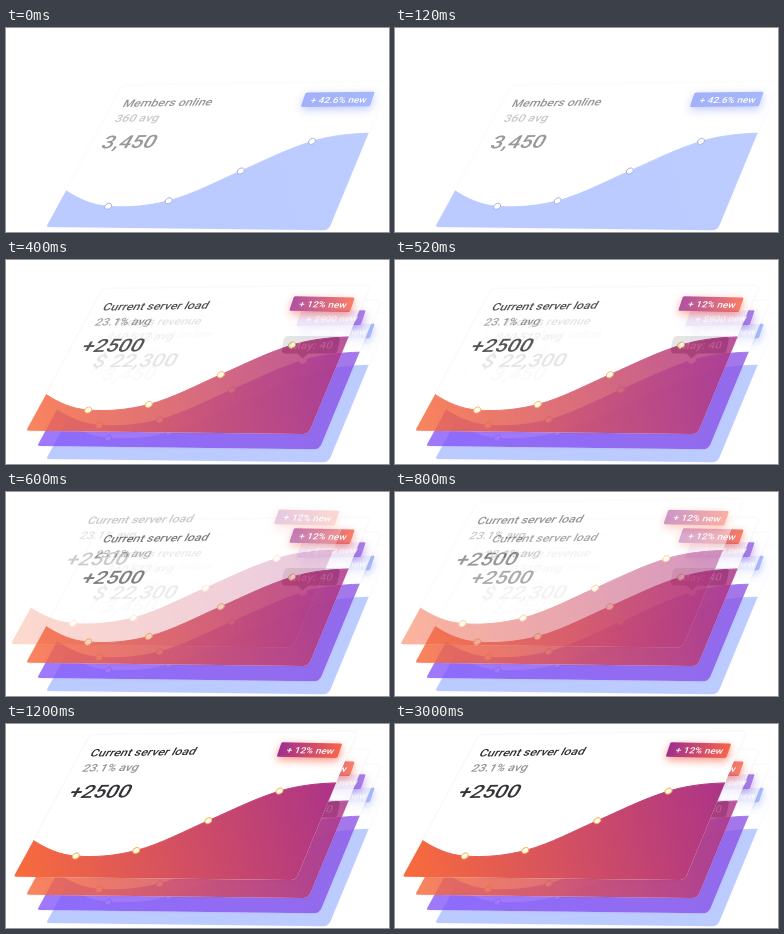
Write an HTML page with a canvas that moves like this. It is 383 px wide and 204 px high and loops after 4.2 s.

```html
<!DOCTYPE html>
<html lang="en">
<head>
<meta charset="utf-8">
<title>Stacked dashboard cards</title>
<style>
html, body { margin: 0; width: 100%; height: 100%; overflow: hidden; background: #fff; }
canvas { display: block; width: 383px; height: 204px; }
</style>
</head>
<body>
<canvas id="stage"></canvas>
<script>
const W = 383, H = 204, STEP = 200, LOOP = 4200;
const FONT = 'Roboto, Arial, sans-serif';
const dpr = window.devicePixelRatio || 1;

function prepare(canvas) {
  canvas.width = W * dpr;
  canvas.height = H * dpr;
  return canvas.getContext('2d');
}

const stage = document.getElementById('stage');
const ctx = prepare(stage);
const layer = document.createElement('canvas');
const g = prepare(layer);

const members = {
  title: 'Members online', sub: '360 avg', value: '3,450', tag: '+ 42.6% new', tilt: -0.01,
  wave: ['#7a98ff', '#7c9aff'], pill: ['#4664f4', '#5272f8'], ring: '#4c62c0', dot: '#fff'
};
const revenue = {
  title: 'Today’s revenue', sub: '$40,512 avg', value: '$ 22,300', tag: '+ $900 new', tilt: -0.02,
  wave: ['#804dfb', '#864ae4'], pill: ['#6f38cc', '#8850dc'], ring: '#68b878', dot: '#fff',
  tip: 'May: 40'
};
const load = {
  title: 'Current server load', sub: '23.1% avg', value: '+2500', tag: '+ 12% new', tilt: 0.022,
  wave: ['#f76a3e', '#ae3586'], pill: ['#9f2f90', '#f8644a'], ring: '#f3ad4c', dot: '#fffbe8'
};

const dots = [[102.2, 178.3], [162.7, 172.8], [234.8, 143], [306, 113.4]];

function ramp(x0, y0, x1, y1, colors) {
  const fill = g.createLinearGradient(x0, y0, x1, y1);
  colors.forEach((c, i) => fill.addColorStop(i, c));
  return fill;
}

function shadow(color, blur, dy) {
  g.shadowColor = color;
  g.shadowBlur = blur * dpr;
  g.shadowOffsetY = dy * dpr;
}

function plainShadow() {
  shadow('transparent', 0, 0);
}

// Text lies in the plane of the tilted card.
function label(text, x, y, size, weight, color, lean = -0.47, tilt = -0.018) {
  g.save();
  g.transform(1, tilt, lean, 0.84, x, y);
  g.font = `${weight} ${size}px ${FONT}`;
  g.fillStyle = color;
  g.fillText(text, 0, 0);
  g.restore();
}

function textWidth(text, size, weight) {
  g.font = `${weight} ${size}px ${FONT}`;
  return g.measureText(text).width;
}

function skewBox(x, y, w, h, lean, r, fill, tilt = 0) {
  g.save();
  g.transform(1, tilt, -lean / h, 1, x, y);
  g.beginPath();
  g.roundRect(0, 0, w, h, r);
  g.fillStyle = fill;
  g.fill();
  g.restore();
}

function bottomRight() {
  g.lineTo(324.6, 197);
  g.quadraticCurveTo(322, 203, 316, 202.3);
}

function drawSheet() {
  g.beginPath();
  g.moveTo(41, 199);
  g.lineTo(115, 61);
  g.quadraticCurveTo(117, 57.5, 121, 57.4);
  g.lineTo(379, 54);
  g.quadraticCurveTo(384, 54, 382, 58);
  bottomRight();
  g.closePath();
  shadow('rgba(30,30,60,.08)', 3, 0);
  g.fillStyle = '#fff';
  g.fill();
  plainShadow();
}

function traceCurve() {
  g.beginPath();
  g.moveTo(60, 162.8);
  g.bezierCurveTo(72, 170.6, 86, 177.2, 102.2, 178.3);
  g.bezierCurveTo(122, 180, 143, 177.8, 162.7, 172.8);
  g.bezierCurveTo(189, 165.7, 212, 152.7, 234.8, 143);
  g.bezierCurveTo(258, 132.7, 282, 120.7, 306, 113.4);
  g.bezierCurveTo(325, 107.7, 344, 105.7, 362.5, 105.2);
}

function drawWave(colors) {
  traceCurve();
  bottomRight();
  g.lineTo(43, 199);
  g.quadraticCurveTo(40, 199, 41.5, 196.5);
  g.closePath();
  g.fillStyle = ramp(48, 185, 355, 115, colors);
  g.fill();
  traceCurve();
  g.strokeStyle = g.fillStyle;
  g.lineWidth = 1;
  g.stroke();
}

function drawDots(card) {
  dots.forEach(([x, y], i) => {
    g.beginPath();
    g.ellipse(x, y, 3.7, 2.7, -0.45, 0, 7);
    g.fillStyle = card.dot;
    g.fill();
    g.strokeStyle = card.tip && i === 3 ? '#fff' : card.ring;
    g.lineWidth = 1;
    g.stroke();
  });
}

function drawTag(card) {
  const w = textWidth(card.tag, 10, 500) + 13, x = 368.8 - w;
  shadow(card.pill[1] + 'b0', 9, 3);
  skewBox(x, 64.4, w, 14.6, 5, 1.5, ramp(0, 0, w, 0, card.pill), card.tilt);
  plainShadow();
  label(card.tag, x + 4, 75.2, 10, 500, '#fff', -0.3, card.tilt);
}

function drawTip(text) {
  const ink = '#333336';
  skewBox(287.5, 89, 56, 17.5, 3.5, 4, ink);
  g.beginPath();
  g.moveTo(300, 106);
  g.lineTo(312, 106);
  g.lineTo(305.5, 111.5);
  g.closePath();
  g.fillStyle = ink;
  g.fill();
  label(text, 292.5, 102.2, 12, 500, '#fff', -0.25);
}

function drawCard(card, dx, dy, alpha) {
  g.setTransform(1, 0, 0, 1, 0, 0);
  g.clearRect(0, 0, layer.width, layer.height);
  g.setTransform(dpr, 0, 0, dpr, dx * dpr, dy * dpr);
  drawSheet();
  drawWave(card.wave);
  drawDots(card);
  label(card.title, 115.8, 78.9, 12.3, 500, '#2c2c30');
  label(card.sub, 107.8, 94, 12.3, 500, '#929296');
  label(card.value, 93.8, 120.6, 21.4, 500, '#333337');
  drawTag(card);
  if (card.tip) drawTip(card.tip);
  ctx.globalAlpha = alpha;
  ctx.drawImage(layer, 0, 0, W, H);
  ctx.globalAlpha = 1;
}

function render(ms) {
  const step = Math.min(6, Math.floor((ms % LOOP) / STEP));
  ctx.setTransform(dpr, 0, 0, dpr, 0, 0);
  ctx.fillStyle = '#fff';
  ctx.fillRect(0, 0, W, H);
  drawCard(members, 0, 0, 0.5);
  if (step >= 1) drawCard(revenue, -9, -13, 0.75);
  if (step >= 2) drawCard(load, -20, -28.3, 0.83);
  if (step >= 3) {
    // The front card settles while it fades in.
    const p = (step - 2) / 4;
    drawCard(load, -35.5 + 3 * p * p, -47.1 + 0.8 * p, p);
  }
}

const start = performance.now();
function tick() {
  render(performance.now() - start);
  requestAnimationFrame(tick);
}
tick();
</script>
</body>
</html>
```
